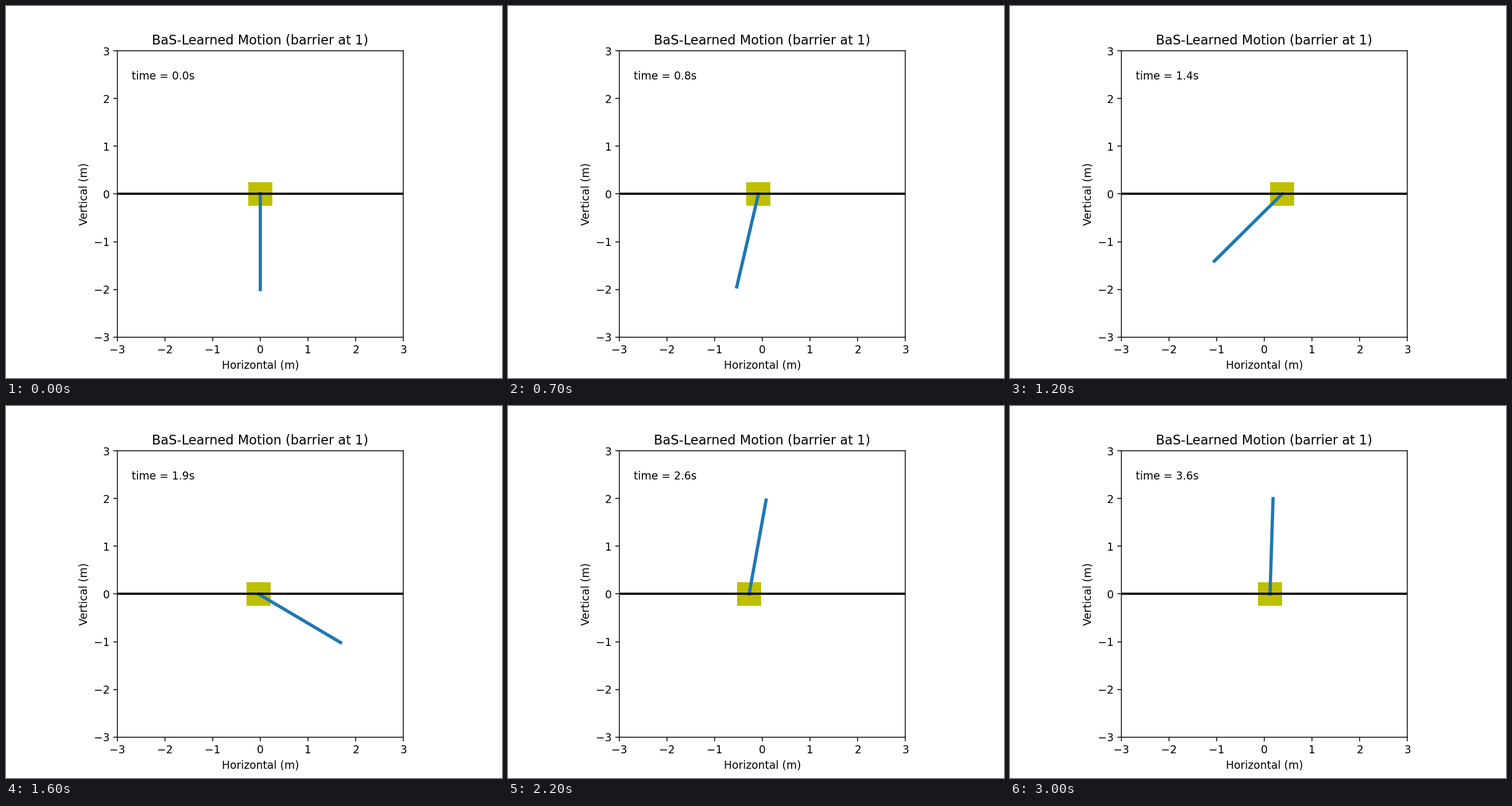
Recreate the animation shown at these times as a matplotlib script. Size 864 by 648 pixels, loop 3.1 s.

```python
import numpy as np
import matplotlib.pyplot as plt
from matplotlib.animation import FuncAnimation
from matplotlib.patches import Rectangle

W, H, DPI = 864, 648, 135
FRAMES = 31
INTERVAL = 100   # ms per frame
DT = 0.12        # simulated seconds per frame
POLE = 2.0
CART = 0.5

# Key poses of the swing-up: step, cart position (m), pole angle (0 = down)
step, key_x, key_angle = np.array([
    (0, 0, 0),
    (4, -0.31, 0.34),
    (7, -0.081, -0.229),
    (10, 0.21, -0.88),
    (12, 0.374, -0.79),
    (14, 0.41, -0.24),
    (16, -0.038, 1.037),
    (19, -0.68, 2.29),
    (22, -0.275, 2.963),
    (26, 0.012, 3.148),
    (30, 0.121, 3.11),
]).T


def ease(keys, i):
    """Smooth Hermite path through the keys, starting at rest."""
    slope = np.gradient(keys, step)
    slope[0] = 0
    k = min(np.searchsorted(step, i, side="right"), len(step) - 1) - 1
    h = step[k + 1] - step[k]
    s = (i - step[k]) / h
    blend = s * s * (3 - 2 * s)
    bend = h * s * (1 - s) * (slope[k] * (1 - s) - slope[k + 1] * s)
    return keys[k] * (1 - blend) + keys[k + 1] * blend + bend


plt.rcParams["font.family"] = "DejaVu Sans"
fig = plt.figure(figsize=(W / DPI, H / DPI), dpi=DPI)
side = 498.6
ax = fig.add_axes([193.6 / W, 71.25 / H, side / W, side / H],
                  xlim=(-3, 3), ylim=(-3, 3))
ax.set_xticks(range(-3, 4))
ax.set_yticks(range(-3, 4))
ax.set_title("BaS-Learned Motion (barrier at 1)")
ax.set_xlabel("Horizontal (m)")
ax.set_ylabel("Vertical (m)")

cart = ax.add_patch(Rectangle((-CART / 2, -CART / 2), CART, CART,
                              facecolor="y", edgecolor="none"))
pole, = ax.plot([], [], color="C0", lw=3)
ax.plot([-3, 3], [0, 0], color="k", lw=2)
clock = ax.text(0.05, 0.9, "", transform=ax.transAxes)


def draw(i):
    x, angle = ease(key_x, i), ease(key_angle, i)
    cart.set_x(x - CART / 2)
    pole.set_data([x, x + POLE * np.sin(angle)], [0, -POLE * np.cos(angle)])
    clock.set_text(f"time = {i * DT:.1f}s")
    return cart, pole, clock


anim = FuncAnimation(fig, draw, frames=FRAMES, interval=INTERVAL,
                     repeat=True, repeat_delay=0, blit=False)
plt.show()
```
